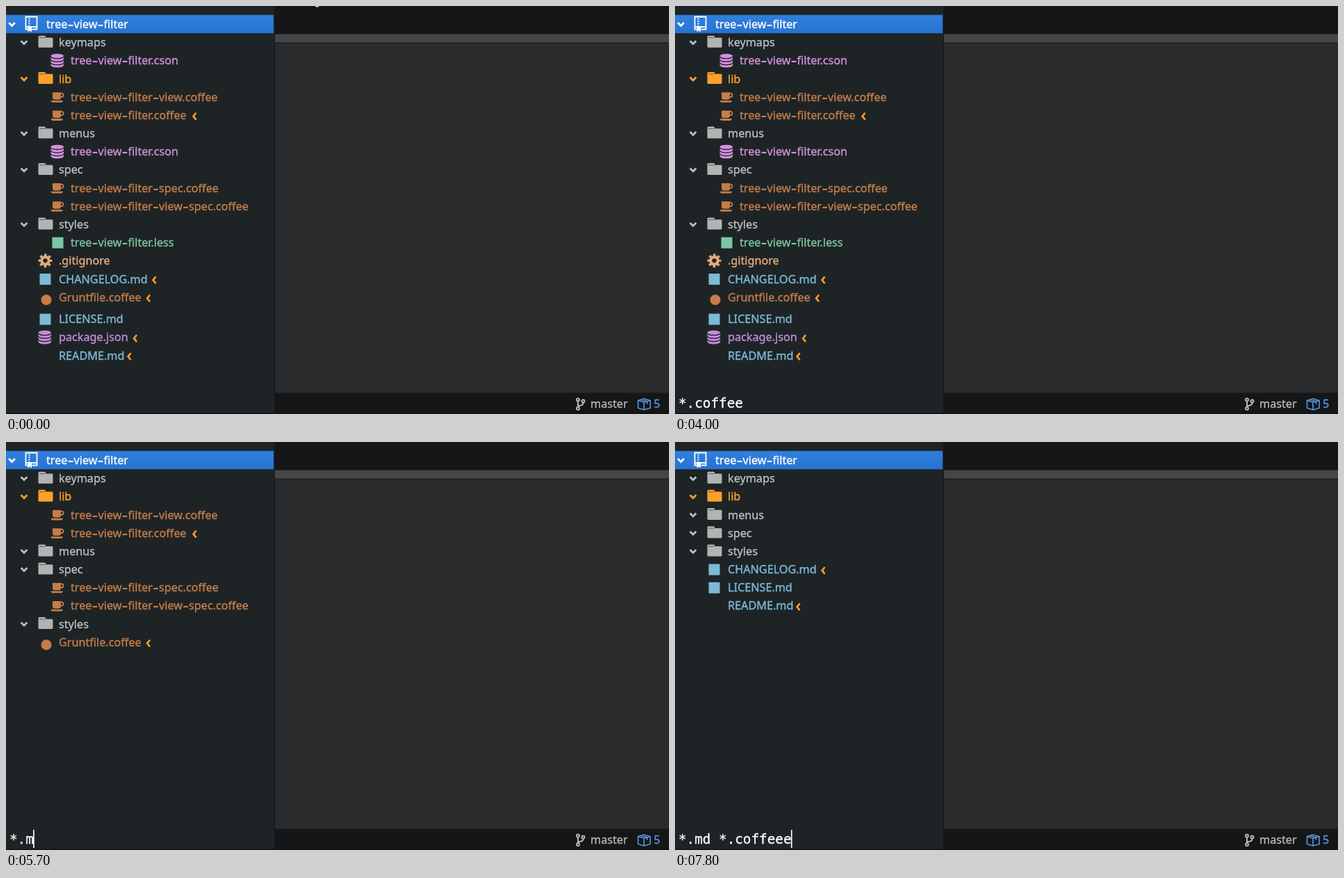
Recreate the animation shown at these times as an HTML page. Size 954x587 px, loop 8000 ms.

```html
<!DOCTYPE html>
<html lang="en">
<head>
<meta charset="utf-8">
<title>Tree filter</title>
<style>
  html, body { margin: 0; width: 100%; height: 100%; overflow: hidden; background: #1e2426; }
  svg { display: block; width: 954px; height: 587px; }
  text {
    font: 500 16.2px "Noto Sans", "Open Sans", sans-serif; white-space: pre;
    fill: currentColor; stroke: currentColor; stroke-width: .35px;
  }
  .dash { font-size: 28px; font-weight: 400; baseline-shift: -2.5px; stroke: none; }
  .mono { font: 19.3px "DejaVu Sans Mono", monospace; }
  .line { fill: none; stroke: currentColor; }
</style>
</head>
<body>
<svg viewBox="0 0 954 587">
  <defs>
    <linearGradient id="blue" x2="0" y2="1">
      <stop stop-color="#2f80dc"/><stop offset="1" stop-color="#2873d2"/>
    </linearGradient>
    <path id="chevron" class="line" d="M-4.4-2 0 2.4 4.4-2" stroke-width="2.8"/>
    <path id="changed" class="line" d="M4.6-4.6 0.6 0.3 4.6 5.2" stroke-width="2.6"/>
    <g id="folder" fill="currentColor">
      <path d="M0-8q0-1.500 1.500-1.500h7.500q1.500 0 1.500 1.500v1.200h9q1.500 0 1.500 1.500v11.300q0 1.500-1.500 1.500h-18q-1.500 0-1.500-1.500z"/>
      <path d="M1.500-6.600h8" stroke="#1e2426" stroke-opacity=".6"/>
    </g>
    <g id="data" fill="currentColor">
      <ellipse cx="9.300" cy="-6.500" rx="9.300" ry="3.100"/>
      <path id="disc" d="M0-4.700q2 2.700 9.300 2.700t9.300-2.700v2.700q-1.500 3.200-9.300 3.200t-9.300-3.200z"/>
      <use href="#disc" y="4.500"/>
      <use href="#disc" y="9"/>
    </g>
    <g id="cup">
      <path fill="currentColor" d="M2.500-6.500h12v7.500q0 3-3 3h-6q-3 0-3-3zM0 5.200h17.500q-.5 2.800-3 2.800h-11.500q-2.500 0-3-2.800z"/>
      <path class="line" d="M14-5h1.500q2.500 0 2.500 2.600t-2.500 2.600h-1.500" stroke-width="1.800"/>
    </g>
    <g id="gear" class="line">
      <circle cx="10" r="5.300" stroke-width="4.200"/>
      <circle cx="10" r="8.200" stroke-width="3.400" stroke-dasharray="3.400 3.040" stroke-dashoffset="1.700"/>
    </g>
    <rect id="square" x="2" y="-7.500" width="16" height="16" fill="currentColor"/>
    <circle id="dot" cx="11.500" cy="4" r="7.500" fill="currentColor"/>
  </defs>

  <rect width="386" height="587" fill="#1e2426"/>
  <rect x="386" width="568" height="587" fill="#141618"/>
  <rect x="387" y="40.500" width="567" height="12" fill="#444648"/>
  <rect x="387" y="53.500" width="567" height="503" fill="#292b2c"/>
  <rect y="585.500" width="954" height="1.500" fill="#101213"/>
  <path id="pointer" d="M444 0h7l-3 2z" fill="#ddd"/>

  <rect x="-2" y="13" width="387" height="26" fill="url(#blue)" stroke="#2364b4" stroke-opacity=".6"/>
  <g color="#fff">
    <use href="#chevron" x="8.500" y="26"/>
    <path class="line" d="M32 33.500h-3.500v-18h16v18h-7M28.500 30h16" stroke-width="1.800"/>
    <path class="line" d="M33.500 17.500v11.500" stroke-width="2" stroke-dasharray="2 1.500"/>
    <path d="M31.500 31h5.500v6.500l-2.700-2.200-2.800 2.200z" fill="#fff"/>
  </g>
  <g id="tree"></g>

  <g color="#b4b7b8">
    <g class="line" stroke-width="2">
      <circle cx="823" cy="566.500" r="2"/><circle cx="823" cy="579" r="2"/><circle cx="830.500" cy="568.500" r="2"/>
      <path d="M823 568.500v8.500M830.500 570.500q0 4-4 4.300t-3.500 2.500"/>
    </g>
    <text x="841" y="578">master</text>
  </g>
  <g color="#5798e4">
    <path class="line" d="M909.500 567.500 918 565l9 2.500v11l-9 2.500-8.500-2.500zl8.500 2.500 9-2.500M918 570v11M913.500 566.300l9 2.500v4" stroke-width="1.600"/>
    <text x="932" y="578">5</text>
  </g>

  <g id="filter">
    <rect id="selection" y="558" height="26" fill="#3d8ed5"/>
    <text id="hint" class="mono" x="5" y="578" color="#3d4446">Filter Pattern</text>
    <text id="input" class="mono" x="5" y="578" color="#fff"></text>
    <rect id="caret" y="558" width="1.700" height="26" fill="#fff"/>
  </g>
</svg>
<script>
const LOOP = 8000, ROW = 26.18, CHAR = 11.62;
const $ = id => document.getElementById(id);
const GREY = '#bcc0c0', ORANGE = '#ff9f2b', PINK = '#d490de', BROWN = '#c57d49',
      BLUE = '#7cbad6', GREEN = '#7ec5a3', TAN = '#e3ac7c', PURPLE = '#c48cda';

// name, colour, icon, depth, x of the change mark
const entries = [
  ['keymaps', GREY, 'folder', 1],
  ['tree-view-filter.cson', PINK, 'data', 2],
  ['lib', ORANGE, 'folder', 1],
  ['tree-view-filter-view.coffee', BROWN, 'cup', 2],
  ['tree-view-filter.coffee', BROWN, 'cup', 2, 269],
  ['menus', GREY, 'folder', 1],
  ['tree-view-filter.cson', PINK, 'data', 2],
  ['spec', GREY, 'folder', 1],
  ['tree-view-filter-spec.coffee', BROWN, 'cup', 2],
  ['tree-view-filter-view-spec.coffee', BROWN, 'cup', 2],
  ['styles', GREY, 'folder', 1],
  ['tree-view-filter.less', GREEN, 'square', 2],
  ['.gitignore', TAN, 'gear', 1],
  ['CHANGELOG.md', BLUE, 'square', 1, 211],
  ['Gruntfile.coffee', BROWN, 'dot', 1, 202.5],
  ['LICENSE.md', BLUE, 'square', 1],
  ['package.json', PURPLE, 'data', 1, 183.5],
  ['README.md', BLUE, '', 1, 175],
];

const label = (name, x, y, color) =>
  `<text x="${x}" y="${y}" color="${color}">${name.replace(/-/g, '<tspan class="dash">-</tspan>')}</text>`;
const use = (id, x, y = 0) => `<use href="#${id}" x="${x}" y="${y}"/>`;

$('tree').innerHTML = label('tree-view-filter', 58, 32, '#fff') +
  entries.map(([name, color, icon, depth, mark]) => {
    const x = depth === 1 ? 46.5 : 64.5;
    return `<g class="row" color="${color}">` +
      (icon === 'folder' ? use('chevron', 26) : '') +
      (icon ? `<g color="${color === GREY ? '#b2b4b4' : color}">${use(icon, x)}</g>` : '') +
      label(name, depth === 1 ? 76 : 93, 6, color) +
      (mark ? `<g color="${ORANGE}">${use('changed', mark, 1.5)}</g>` : '') + '</g>';
  }).join('');
const rows = [...document.querySelectorAll('.row')];

function layout(extension) {
  let y = 26 + ROW;
  entries.forEach(([name, , icon], i) => {
    const shown = icon === 'folder' || name.endsWith(extension);
    rows[i].style.display = shown ? '' : 'none';
    if (!shown) return;
    rows[i].setAttribute('transform', `translate(0 ${y.toFixed(2)})`);
    y += icon === 'dot' ? ROW + 5.3 : ROW;
  });
}

// Each step: time, input text, number of selected characters at its end
const steps = [[1600, '', 0], [2800, '*', 0], [3000, '*.', 0]];
const type = (start, before, added) => [...added].forEach((_, i) =>
  steps.push([start + i * 100, before + added.slice(0, i + 1), 0]));
type(3300, '*.', 'coffee');
for (let n = 1; n <= 6; n++) steps.push([4800 + n * 100, '*.coffee', n]);
type(5700, '*.', 'md');
steps.push([6800, '*.md ', 0]);
type(7000, '*.md ', '*.coffeee');

const show = (id, visible) => $(id).style.display = visible ? '' : 'none';

let current;
function draw(now) {
  const t = now % LOOP;
  const [since, text, selected] = steps.findLast(s => s[0] <= t) || [1500, '', 0];
  const extension = t < 4200 ? '' : t < 5800 ? '.coffee' : '.md';
  if (extension !== current) layout(current = extension);

  show('pointer', t < 2800);
  show('filter', t >= 1500);
  show('hint', !text);
  show('caret', !selected && Math.floor((t - since) / 200) % 2 === 0);
  $('input').textContent = text;
  $('caret').setAttribute('x', 4.2 + text.length * CHAR);
  $('selection').setAttribute('x', 4.5 + (text.length - selected) * CHAR);
  $('selection').setAttribute('width', selected * CHAR);
}

function frame() {
  draw(performance.now());
  requestAnimationFrame(frame);
}
frame();
</script>
</body>
</html>
```
